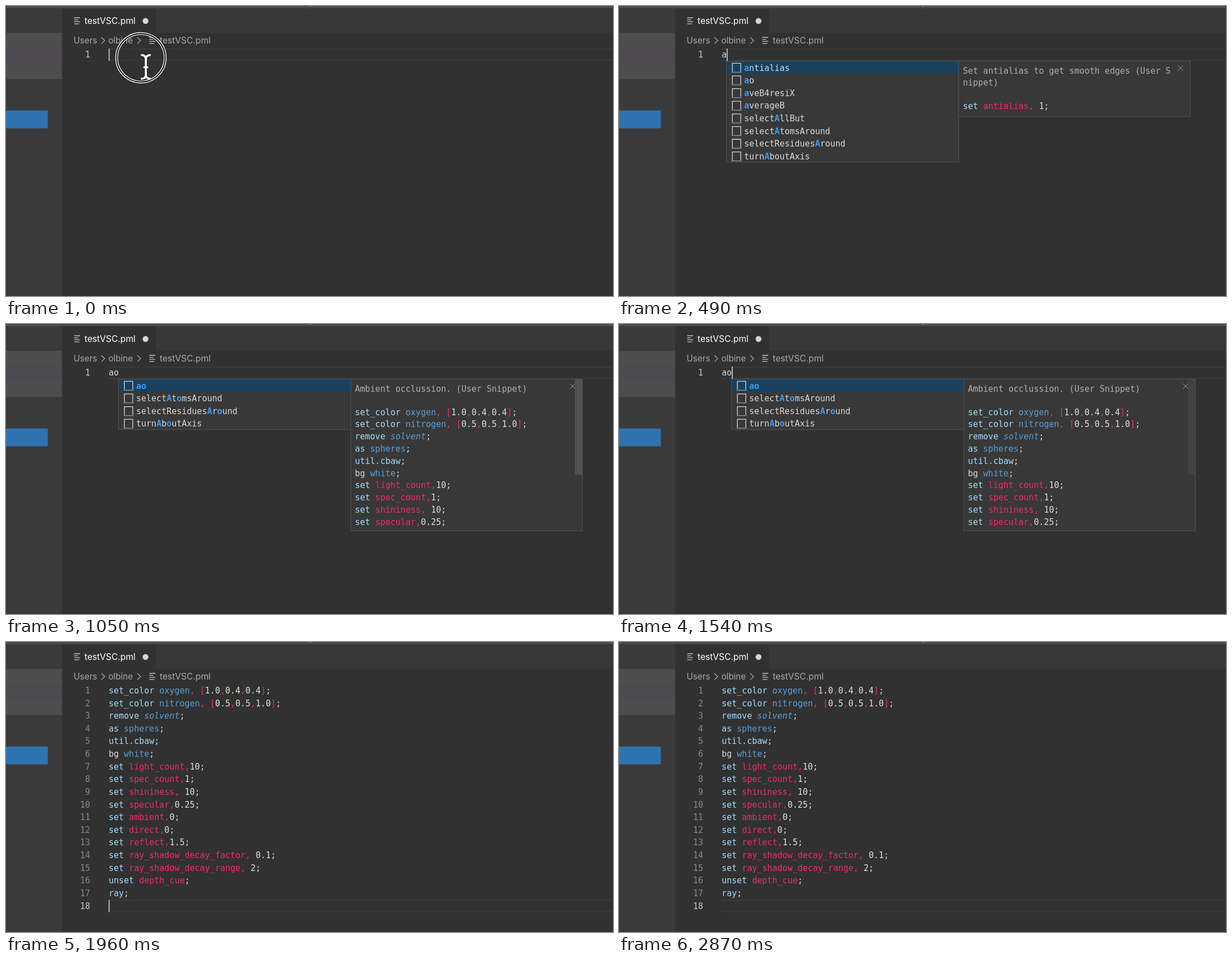
An HTML page for the animation above (2.94 s loop, 1082x518 px).

```html
<!DOCTYPE html>
<html lang="en">
<head>
<meta charset="utf-8">
<title>Snippet completion</title>
<style>
  html, body { margin: 0; width: 100%; height: 100%; overflow: hidden; background: #313131; }
  svg { display: block; width: 1082px; height: 518px; }
  text { white-space: pre; font: 15px "DejaVu Sans Mono", monospace; fill: #d8d8d8; }
  text.ui { font: 15.2px Inter, sans-serif; fill: #a8a8a8; }
  text.file { font-size: 15.6px; }
  text.title { fill: #fff; }
  text.num { fill: #888; text-anchor: end; }
  text.current { fill: #c8c8c8; }
  text.info { fill: #b0b0b0; }
  .match { fill: #3b9bf5; font-weight: bold; }
  .command { fill: #a3dcfa; }
  .value { fill: #5a9fd6; }
  .italic { fill: #5a9fd6; font-style: italic; }
  .number { fill: #d9e3d2; }
  .setting { fill: #f3296f; }
  .line { fill: none; stroke: #a8a8a8; stroke-width: 1.3; }
</style>
</head>
<body>
<svg id="stage" viewBox="0 0 1082 518"></svg>
<script>
const LOOP = 2940;
const TYPE_A = 350, OPEN = 420, TYPE_O = 560, EXPAND = 1960;
const ROW = 22.62, DOC_ROW = 21.8, LEFT = 183;
const stage = document.getElementById('stage');

function add(parent, tag, attrs = {}, content) {
  const el = document.createElementNS('http://www.w3.org/2000/svg', tag);
  for (const key in attrs) el.setAttribute(key, attrs[key]);
  if (content !== undefined) el.textContent = content;
  parent.append(el);
  return el;
}
const rect = (parent, x, y, width, height, fill, more) =>
  add(parent, 'rect', { x, y, width, height, fill, ...more });
const path = (parent, d, more) => add(parent, 'path', { d, class: 'line', ...more });
const text = (parent, x, y, content, cls = '') =>
  add(parent, 'text', { x, y, class: cls }, content);
const rowY = i => 92 + ROW * i;

// Syntax colouring
const COMMANDS = ['set_color', 'remove', 'as', 'util.cbaw', 'set', 'unset', 'ray'];
const VALUES = ['oxygen', 'nitrogen', 'spheres', 'white'];
function tokenClass(token) {
  if (COMMANDS.includes(token)) return 'command';
  if (VALUES.includes(token)) return 'value';
  if (token === 'solvent') return 'italic';
  if (/^\d/.test(token)) return 'number';
  return token !== 'bg' && /[\w\[\],]/.test(token) ? 'setting' : '';
}
function code(parent, x, y, source) {
  const el = text(parent, x, y, '');
  for (const token of source.match(/\w[\w.]*|[\[\],]|[^\w\[\],]+/g))
    add(el, 'tspan', { class: tokenClass(token) }, token);
}

const SNIPPET = `set_color oxygen, [1.0,0.4,0.4];
set_color nitrogen, [0.5,0.5,1.0];
remove solvent;
as spheres;
util.cbaw;
bg white;
set light_count,10;
set spec_count,1;
set shininess, 10;
set specular,0.25;
set ambient,0;
set direct,0;
set reflect,1.5;
set ray_shadow_decay_factor, 0.1;
set ray_shadow_decay_range, 2;
unset depth_cue;
ray;`.split('\n');

// Window frame
function fileIcon(x, y) {
  path(stage, `M${x} ${y}h10.5M${x} ${y + 3.6}h7M${x} ${y + 7.2}h10.5M${x} ${y + 10.8}h9`,
    { style: 'stroke:#c4c4c4' });
}
rect(stage, 0, 0, 1082, 518, '#313131');
rect(stage, 0, 0, 100, 518, '#3a3a3a');
rect(stage, 100, 4, 982, 44, '#383838');
rect(stage, 100, 4, 167, 44, '#313131');
rect(stage, 0, 0, 1082, 4, '#4b4b4b');
rect(stage, 541, 0, 3, 1, '#999');
rect(stage, 0, 48, 100, 82.5, '#4d4d4d');
rect(stage, 0, 75, 100, 27, '#4c4950');
rect(stage, 0, 186.7, 74.5, 31.8, '#2e73b0');
fileIcon(121.5, 21);
text(stage, 140, 32.3, 'testVSC.pml', 'ui file title');
add(stage, 'circle', { cx: 248.7, cy: 26.8, r: 5.2, fill: '#d6d6d6' });
text(stage, 120.5, 67, 'Users', 'ui');
text(stage, 182.5, 67, 'olbine', 'ui');
text(stage, 274, 67, 'testVSC.pml', 'ui file');
for (const x of [170, 234]) path(stage, `M${x} 56l6 5.7l-6 5.7`);
fileIcon(255.5, 56);

// Editor contents
const spans = [];
function layer(from, to) {
  const el = add(stage, 'g');
  spans.push({ el, from, to });
  return el;
}
function currentLine(parent, row) {
  const y = 76 + ROW * row;
  for (const edge of [y, y + 20]) rect(parent, LEFT, edge, 899, 2, '#3a3a3a');
  text(parent, 150, rowY(row), row + 1, 'num current');
}
currentLine(layer(0, EXPAND), 0);
text(layer(TYPE_A, TYPE_O), LEFT, rowY(0), 'a');
text(layer(TYPE_O, EXPAND), LEFT, rowY(0), 'ao');

const expanded = layer(EXPAND, LOOP);
SNIPPET.forEach((source, i) => {
  text(expanded, 150, rowY(i), i + 1, 'num');
  code(expanded, LEFT, rowY(i), source);
});
currentLine(expanded, SNIPPET.length);

// Completion popup; asterisks enclose matched letters
function popup(parent, x, items, info, docs, docHeight) {
  const border = { stroke: '#525252' };
  rect(parent, x, 98.5, 414, items.length * ROW - .5, '#383838', border);
  rect(parent, x + .5, 99, 413, ROW, '#19415e');
  items.forEach((item, i) => {
    const y = 102.3 + ROW * i;
    path(parent, `M${x + 10.5} ${y + 15}v-15h15v15`, { style: 'stroke:#d8d8d8' });
    path(parent, `M${x + 9.8} ${y + 16}h17`,
      { style: 'stroke:#d8d8d8', 'stroke-dasharray': '2 1.2' });
    const label = text(parent, x + 31.5, y + 13.2, '');
    item.split('*').forEach((part, n) =>
      add(label, 'tspan', { class: n % 2 ? 'match' : '' }, part));
  });
  rect(parent, x + 414, 98.5, 413, docHeight, '#383838', border);
  info.forEach((line, i) => text(parent, x + 421.5, 120.5 + DOC_ROW * i, line, 'info'));
  const codeTop = 140.7 + DOC_ROW * info.length;
  docs.forEach((line, i) => code(parent, x + 421.5, codeTop + DOC_ROW * i, line));
  path(parent, `M${x + 805} 106.5l9 9m0 -9l-9 9`, { style: 'stroke-width:.9' });
}
popup(layer(OPEN, TYPE_O), 191.5,
  ['*a*ntialias', '*a*o', '*a*veB4resiX', '*a*verageB', 'select*A*llBut',
   'select*A*tomsAround', 'selectResidues*A*round', 'turn*A*boutAxis'],
  ['Set antialias to get smooth edges (User S', 'nippet)'], ['set antialias, 1;'], 99);

const aoPopup = layer(TYPE_O, EXPAND);
popup(aoPopup, 200.5,
  ['*ao*', 'select*A*t*o*msAround', 'selectResidues*A*r*o*und', 'turn*A*b*o*utAxis'],
  ['Ambient occlussion. (User Snippet)'], SNIPPET.slice(0, 10), 271);
const scrollbar = rect(aoPopup, 1014, 99, 13.5, 170.5, '#525252');

const caret = rect(stage, 0, 0, 1.5, 22, '#dedede');

// Pointer and click ring
const pointer = layer(0, TYPE_A);
const beam = 'M240.5 87.5C246 87.5 249.3 90 249.3 95C249.3 90 252.5 87.5 258 87.5'
  + 'M249.3 94V124M240.5 130C246 130 249.3 127.5 249.3 123C249.3 127.5 252.5 130 258 130M245 109.5h8.6';
path(pointer, beam, { style: 'stroke:#222;stroke-width:5.4' });
path(pointer, beam, { style: 'stroke:#fff;stroke-width:3.6' });
const ring = layer(0, 105);
for (const [r, stroke, width] of [[43.3, '#111', 4.6], [45, '#f4f4f4', 1.4], [41.6, '#f4f4f4', 1.4]])
  add(ring, 'circle', { cx: 240.5, cy: 92.5, r, fill: 'none', stroke, 'stroke-width': width });

// Start time, column, row, visible
const CARET = [
  [0, 0, 0, 1], [TYPE_A, 1, 0, 1], [TYPE_O, 2, 0, 1], [1045, 2, 0, 0],
  [1540, 2, 0, 1], [EXPAND, 0, 17, 1], [2450, 0, 17, 0]
];
const clamp = v => Math.max(0, Math.min(1, v));

function render(t) {
  for (const { el, from, to } of spans)
    el.style.display = t >= from && t < to ? '' : 'none';
  const [, column, row, visible] = CARET.findLast(step => t >= step[0]);
  caret.setAttribute('x', LEFT + 9.03 * column);
  caret.setAttribute('y', 76 + ROW * row);
  caret.style.opacity = visible;
  scrollbar.style.opacity = Math.min(clamp((t - 630) / 100), clamp((1862 - t) / 800));
}

const start = performance.now();
function tick() {
  render((performance.now() - start) % LOOP);
  requestAnimationFrame(tick);
}
tick();
</script>
</body>
</html>
```
